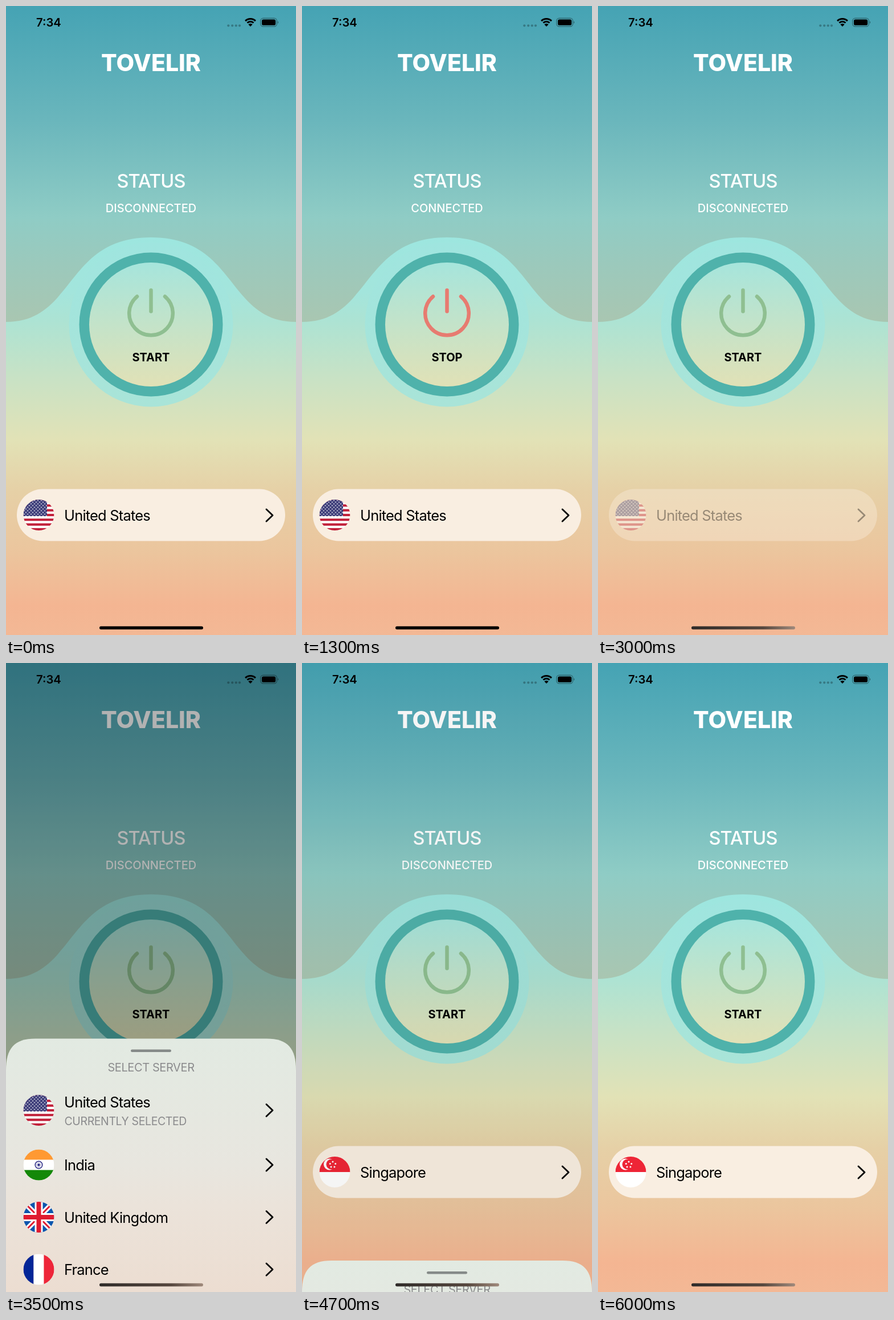
Recreate the animation shown at these times as an HTML page. Size 509 by 1101 pixels, loop 6.1 s.

```html
<!DOCTYPE html>
<html lang="en">
<head>
<meta charset="utf-8">
<title>Connection screen</title>
<style>
  html, body { margin: 0; width: 100%; height: 100%; overflow: hidden; }
  svg { display: block; width: 100vw; height: 100vh; }
  text { font-family: Inter, "Open Sans", sans-serif; }
  .mid { text-anchor: middle; }
  .name { font-size: 25.5px; letter-spacing: -.032em; }
  .chevron { fill: none; stroke: #000; stroke-width: 2.8; stroke-linecap: round; stroke-linejoin: round; }
</style>
</head>
<body>
<svg id="stage" viewBox="0 0 509 1101" preserveAspectRatio="none"></svg>
<script>
const LOOP = 6100, STEP = 100;

// Gradient along one axis in stage units: stops are [position, color].
function gradient(id, from, to, stops, axis = 'y') {
  const other = axis === 'y' ? 'x' : 'y';
  const body = stops.map(([at, color]) =>
    `<stop offset="${(at - from) / (to - from)}" stop-color="${color}"/>`).join('');
  return `<linearGradient id="${id}" gradientUnits="userSpaceOnUse"
    ${axis}1="${from}" ${axis}2="${to}" ${other}1="0" ${other}2="0">${body}</linearGradient>`;
}

const rect = (x, y, w, h, fill, extra = '') =>
  `<rect x="${x}" y="${y}" width="${w}" height="${h}" fill="${fill}" ${extra}/>`;
const circle = (x, y, r, fill, extra = '') =>
  `<circle cx="${x}" cy="${y}" r="${r}" fill="${fill}" ${extra}/>`;
const line = (d, color, width) =>
  `<path d="${d}" fill="none" stroke="${color}" stroke-width="${width}"/>`;
const bands = (...colors) => colors.map((c, i) =>
  rect(-27, -27 + i * 54 / colors.length, 54, 54 / colors.length + .3, c)).join('');
const ring = (n, draw) => Array.from({ length: n }, (_, i) => draw(i * 2 * Math.PI / n)).join('');

// Flags are drawn around 0,0 and cut to a circle.
const flags = {
  'United States':
    bands(...Array.from({ length: 13 }, (_, i) => i % 2 ? '#fff' : '#c1203a')) +
    rect(-27, -27, 41.5, 29, '#3b3b78') + rect(-27, -27, 41.5, 29, 'url(#stars)'),
  'India':
    bands('#ff9932', '#fff', '#138808') +
    circle(0, 0, 6.4, 'none', 'stroke="#1c1c7c" stroke-width="1.3"') +
    circle(0, 0, 1.7, '#1c1c7c') +
    ring(12, a => line(`M0 0L${6 * Math.cos(a)} ${6 * Math.sin(a)}`, '#1c1c7c', .4)),
  'United Kingdom':
    rect(-27, -27, 54, 54, '#0b56ae') +
    line('M-27-27L27 27M27-27L-27 27', '#fff', 9) +
    line('M-27-27L27 27M27-27L-27 27', '#df1b30', 3) +
    line('M-27 0H27M0-27V27', '#fff', 14) +
    line('M-27 0H27M0-27V27', '#df1b30', 8),
  'France':
    rect(-27, -27, 18, 54, '#022597') + rect(-9, -27, 18, 54, '#fff') + rect(9, -27, 18, 54, '#ee2539'),
  'Germany': bands('#000', '#dd0815', '#ffce00'),
  'Singapore':
    bands('#ee2536', '#fff') +
    circle(-9.5, -13.5, 10, '#fff') + circle(-6, -13.5, 9, '#ee2536') +
    ring(5, a => circle(-3.5 + 5 * Math.sin(a), -13 - 5 * Math.cos(a), 1.5, '#fff')),
};
const countries = Object.keys(flags);
const flagUse = (i, y, id = '') => `<use ${id} href="#flag${i}" x="57.5" y="${y}"/>`;
const chevron = y => `<path class="chevron" d="M457 ${y - 10.5}L468 ${y}L457 ${y + 10.5}"/>`;

function row(name, i) {
  const y = i ? 787 + i * 91.5 : 783;
  const subtitle = i ? '' :
    `<text x="102.5" y="808.5" font-size="19.5" letter-spacing="-.02em" fill="#8b8b8d">CURRENTLY SELECTED</text>`;
  return `<g id="row${i}">${flagUse(i, y)}
    <text class="name" x="102" y="${i ? y + 9.5 : 778}">${name}</text>${subtitle}${chevron(y)}</g>`;
}

const hump = 'M0 553C122 553 103 405 254.5 405S387 553 509 553';
const wifiArc = r => {
  const d = r * Math.SQRT1_2;
  return line(`M${429 - d} ${35 - d}A${r} ${r} 0 0 1 ${429 + d} ${35 - d}`, '#000', 3);
};

document.getElementById('stage').innerHTML = `
<defs>
  ${gradient('sky', 0, 553, [[0, '#45a3b4'], [200, '#6ab6bc'], [370, '#8fccc5'], [450, '#9bc9bc'], [553, '#a9c6b1']])}
  ${gradient('ground', 405, 1101, [[405, '#9de6df'], [500, '#a3e5dc'], [553, '#ade3d3'], [650, '#c8e2c5'],
    [760, '#e2e2b6'], [850, '#e6d0a6'], [950, '#ebc69e'], [1050, '#f4b592'], [1101, '#f3b895']])}
  ${gradient('glow', 413, 701, [[413, '#9fe5df'], [701, '#a9e4d8']])}
  ${gradient('disc', 449, 666, [[449, '#a6e5dc'], [666, '#e1e1b6']])}
  ${gradient('paper', 657, 1101, [[657, '#e2eae2'], [880, '#e8e6df'], [950, '#ebe3da'], [1101, '#ecddd1']])}
  ${gradient('worn', 164, 346, [[164, '#2f2b29'], [290, '#57483f'], [346, '#a08a7c']], 'x')}
  <pattern id="stars" width="6" height="6" patternUnits="userSpaceOnUse">
    ${circle(1.5, 1.5, 1, '#fff')}${circle(4.5, 4.5, 1, '#fff')}
  </pattern>
  <clipPath id="round"><circle r="27"/></clipPath>
  <clipPath id="list"><rect y="734" width="509" height="367"/></clipPath>
  ${countries.map((c, i) => `<g id="flag${i}" clip-path="url(#round)">${flags[c]}</g>`).join('')}
</defs>

${rect(0, 0, 509, 1101, 'url(#ground)')}
<path d="${hump}V0H0Z" fill="url(#sky)"/>
<g fill="#fff" class="mid">
  <text x="254.5" y="114" font-size="41" font-weight="800">TOVELIR</text>
  <text x="254.5" y="318" font-size="32.5" font-weight="500" letter-spacing="-.03em">STATUS</text>
  <text id="status" x="254.5" y="361" font-size="20" font-weight="500"></text>
</g>

<g id="button">
  ${circle(254.5, 557.5, 144, 'url(#glow)')}
  ${circle(254.5, 557.5, 126, '#4fb2ab')}
  ${circle(254.5, 557.5, 108.5, 'url(#disc)')}
  <path id="power" d="M230 508.5A38.3 38.3 0 1 0 279 508.5M254.5 497.5V534.5"
    fill="none" stroke-width="6.5" stroke-linecap="round"/>
  <text id="action" class="mid" x="254.5" y="622" font-size="20" font-weight="700"></text>
</g>

<g id="card">
  ${rect(19, 845.5, 471, 91, '#f9eee1', 'rx="45.5"')}
  ${flagUse(0, 891, 'id="cardFlag"')}
  <text id="cardName" class="name" x="102" y="900.5"></text>
  ${chevron(891.5)}
</g>

${rect(0, 0, 509, 1101, '#000', 'id="dim"')}

<g id="sheet">
  <path d="M0 1101V713C0 675 14 657.5 52 657.5H457C495 657.5 509 675 509 713V1101Z" fill="url(#paper)"/>
  ${rect(219, 676.5, 71, 4.6, '#858a88', 'rx="2.3"')}
  <text class="mid" x="254.5" y="715" font-size="20" letter-spacing="-.02em" fill="#8b8b8d">SELECT SERVER</text>
  <g clip-path="url(#list)"><g id="rows">${countries.map(row).join('')}</g></g>
</g>

<text x="53" y="36" font-size="20.3" font-weight="600">7:34</text>
${[390.3, 397.2, 403.8, 410].map(x => circle(x, 34.3, 2.1, '#000', 'opacity=".27"')).join('')}
${wifiArc(12.6)}${wifiArc(7.8)}
<path d="M429 36L425.3 32.2A5.2 5.2 0 0 1 432.7 32.2Z"/>
${rect(446.8, 21.3, 28.6, 14.6, 'none', 'rx="4.6" stroke="#000" stroke-opacity=".4" stroke-width="1.2"')}
${rect(449, 23.4, 24.2, 10.4, '#000', 'rx="2.9"')}
<path d="M477 26.2Q479.4 28.6 477 31Z" opacity=".45"/>
${rect(164, 1085.8, 182, 5.4, '#000', 'id="home" rx="2.7"')}`;

const $ = id => document.getElementById(id);
const clamp = x => Math.min(1, Math.max(0, x));
const progress = (t, from, to) => clamp((t - from) / (to - from));
const easeOut = x => 1 - (1 - x) ** 3;
const easeInOut = x => x < .5 ? 2 * x * x : 1 - 2 * (1 - x) ** 2;

// A touched control fades in 150 ms and comes back after the finger lifts.
const HOLD = 170;
const POWER_TAPS = [500, 1700, 4980, 5530];
const CARD_TAP = 2750, ROW_TAP = 4350;

function touch(t, at) {
  const down = easeInOut(progress(t, at, at + 150));
  const up = easeInOut(progress(t, at + HOLD, at + HOLD + 250));
  return 1 - .8 * (down - up);
}

// Each layer fades by itself, so lower layers show through.
function fadeLayers(id, opacity) {
  for (const layer of $(id).children) layer.setAttribute('opacity', opacity);
}

function render(t) {
  const connected = POWER_TAPS.filter(at => t >= at + HOLD).length % 2 === 1;
  $('status').textContent = connected ? 'CONNECTED' : 'DISCONNECTED';
  $('action').textContent = connected ? 'STOP' : 'START';
  $('power').setAttribute('stroke', connected ? '#e77b70' : '#8fbf91');
  fadeLayers('button', Math.min(...POWER_TAPS.map(at => touch(t, at))));

  const selected = t < ROW_TAP + HOLD ? 0 : 5;
  $('cardFlag').setAttribute('href', '#flag' + selected);
  $('cardName').textContent = countries[selected];
  fadeLayers('card', touch(t, CARD_TAP));

  const open = easeOut(progress(t, 3000, 3450)) - easeOut(progress(t, 4500, 4900));
  $('dim').setAttribute('opacity', .3 * open);
  $('sheet').setAttribute('transform', `translate(0 ${444 * (1 - open)})`);
  $('rows').setAttribute('transform', `translate(0 ${-252 * easeOut(progress(t, 3600, 4250))})`);
  $('row5').setAttribute('opacity', touch(t, ROW_TAP));
  $('home').setAttribute('fill', t < 2900 ? '#000' : 'url(#worn)');
}

function tick() {
  render(Math.floor(performance.now() % LOOP / STEP) * STEP);
  requestAnimationFrame(tick);
}
tick();
</script>
</body>
</html>
```
